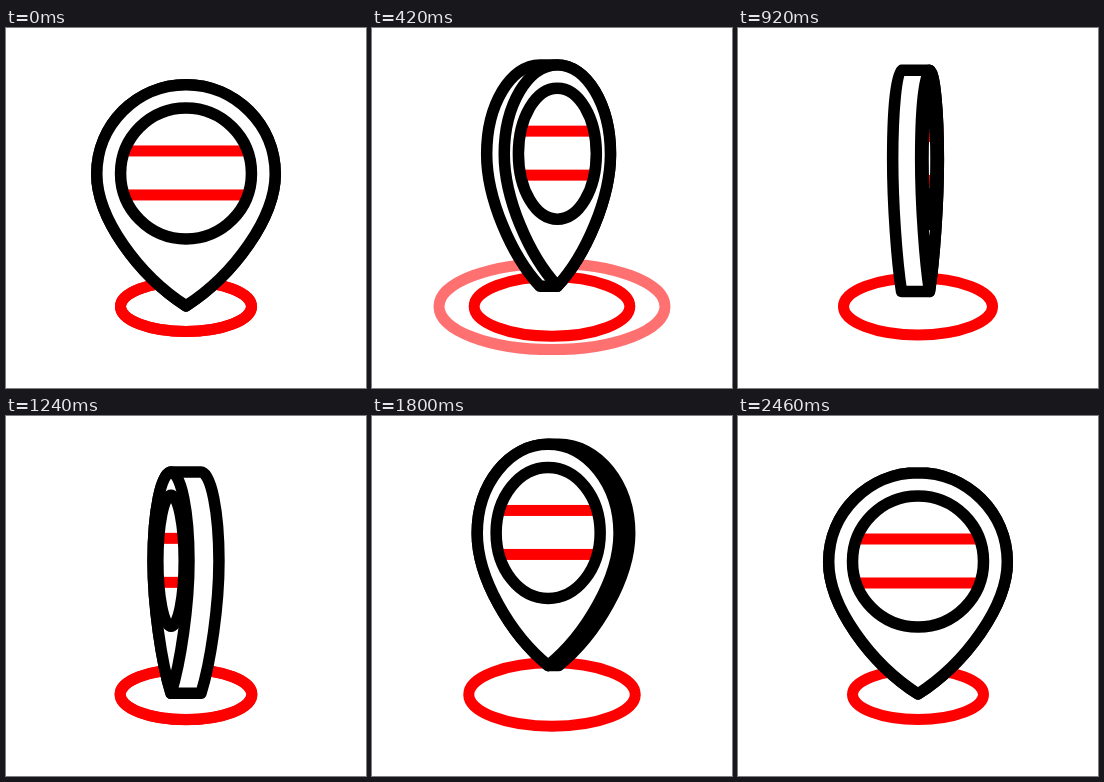
These frames come from a looping animation (360 px wide and 360 px high, 3 s). An HTML page with a canvas:

```html
<!DOCTYPE html>
<html>
<head>
<meta charset="utf-8">
<style>
  html, body { margin: 0; width: 100%; height: 100%; overflow: hidden; background: #fff; }
  canvas { display: block; width: 360px; height: 360px; }
</style>
</head>
<body>
<canvas id="stage" width="360" height="360"></canvas>
<script>
const ctx = document.getElementById('stage').getContext('2d');
const LOOP = 3000, CENTER = 180, RED = '#f00', BLACK = '#000';

// Keyframe tracks: [time, value], linear between keys
const LIFT = [[0, 0], [615, 1], [1228, 0], [1810, 1], [2460, 0]];
const TURN = [[0, 1], [260, .77], [600, .4], [1240, -.2], [1560, -.545], [2000, -1]];
const RIGHT = [[0, 0], [260, 3], [600, 8], [1240, 15], [1560, 15], [2000, 0]];
const LEFT = [[0, 0], [260, -7], [600, -18], [1240, -15], [1560, -8.5], [2000, 0]];
const PULSES = [0, 1215], PULSE_TIME = 575;

function track(keys, t) {
  const i = keys.findIndex(k => k[0] > t);
  if (i < 0) return keys[keys.length - 1][1];
  const [t0, a] = keys[i - 1], [t1, b] = keys[i];
  return a + (b - a) * (t - t0) / (t1 - t0);
}

const ease = p => (1 - Math.cos(Math.PI * p)) / 2;

function stroke(color, width) {
  ctx.strokeStyle = color;
  ctx.lineWidth = width;
  ctx.stroke();
}

function ring(scale, alpha) {
  ctx.globalAlpha = alpha;
  ctx.beginPath();
  ctx.ellipse(CENTER, 278.5, 65.5 * scale, 25 * scale, 0, 0, 2 * Math.PI);
  stroke(RED, 11);
  ctx.globalAlpha = 1;
}

// Pin outline whose left and right halves may sit apart
function pin(left, right, w) {
  ctx.beginPath();
  ctx.moveTo(left, 56.75);
  ctx.bezierCurveTo(left - 49.3 * w, 56.75, left - 89.3 * w, 96.7, left - 89.3 * w, 146);
  ctx.bezierCurveTo(left - 89.3 * w, 190, left - 48 * w, 247, left, 278);
  ctx.lineTo(right, 278);
  ctx.bezierCurveTo(right + 48 * w, 247, right + 89.3 * w, 190, right + 89.3 * w, 146);
  ctx.bezierCurveTo(right + 89.3 * w, 96.7, right + 49.3 * w, 56.75, right, 56.75);
  ctx.closePath();
  ctx.fillStyle = '#fff';
  ctx.fill();
  stroke(BLACK, 11.5);
}

function face(x, w) {
  pin(x, x, w);
  const hole = new Path2D();
  hole.ellipse(x, 145.5, 65.5 * w, 65.5, 0, 0, 2 * Math.PI);
  ctx.save();
  ctx.clip(hole);
  ctx.fillStyle = RED;
  for (const y of [117.5, 161.5]) ctx.fillRect(x - 70, y, 140, 11);
  ctx.restore();
  ctx.lineWidth = 11.5;
  ctx.stroke(hole);
}

function draw(t) {
  const lift = track(LIFT, t), turn = track(TURN, t);
  const left = CENTER + track(LEFT, t), right = CENTER + track(RIGHT, t);
  const width = Math.abs(turn);

  ctx.fillStyle = '#fff';
  ctx.fillRect(0, 0, 360, 360);
  ctx.lineJoin = 'round';

  for (const start of PULSES) {
    const p = (t - start) / PULSE_TIME;
    if (p >= 0 && p < 1) ring(1 + .87 * ease(p), 1 - ease(Math.max(0, 2 * p - 1)));
  }
  ring(1 + .275 * lift, 1);

  ctx.save();
  ctx.translate(0, -29 * lift);
  pin(left, right, width);
  face(turn > 0 ? right : left, width);
  ctx.restore();
}

function tick() {
  draw(performance.now() % LOOP);
  requestAnimationFrame(tick);
}
tick();
</script>
</body>
</html>
```
